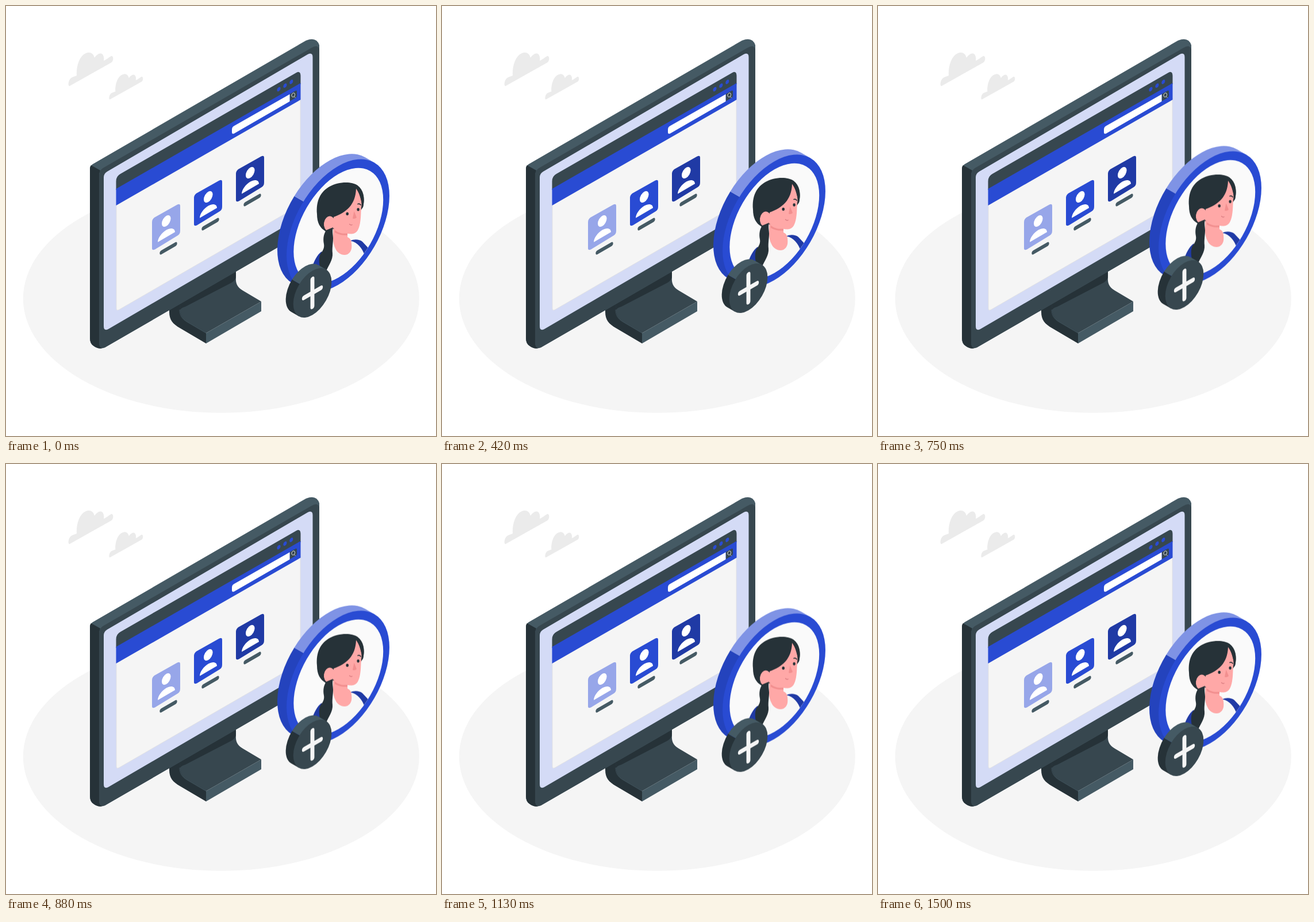
These frames come from a looping animation (748 by 748 pixels, 1.54 s). An HTML page:

```html
<!DOCTYPE html>
<html lang="en">
<head>
<meta charset="utf-8">
<title>Add a profile</title>
<style>
  html, body { margin: 0; width: 100%; height: 100%; overflow: hidden; background: #fff; }
  svg { display: block; width: 100vw; height: 100vh; }
</style>
</head>
<body>
<svg viewBox="0 0 748 748">
  <defs>
    <clipPath id="lens">
      <circle r="90" transform="matrix(.866 -.5 0 1 578.3 382.3)"/>
    </clipPath>
  </defs>

  <ellipse cx="374.3" cy="508.7" rx="344.5" ry="199" fill="#f5f5f5"/>

  <g fill="#ebebeb">
    <path id="cloud" d="M110 139.5C107 137 109 127 115 124L123 121C122 105 128 83 143 81C150 80 153 86 154 90C158 84 164 80 168 84C170 87 171 91 170 95C174 94 179 89 183 87C187 86 188 95 183 98.5Z"/>
    <use href="#cloud" transform="translate(97.2 57.1) scale(.757)"/>
  </g>

  <g id="stand">
    <path fill="#263238" d="M284 520V532C284 546 290 553 303 560.500L348 587V569L320 530V500Z"/>
    <path fill="#37474f" d="M303 510L400 452V473C399 484 404 490 412 495L444 514L348 569L314 549C304 543 301 532 303 518Z"/>
    <path fill="#263238" d="M303 510L400 452V468C400 475 397 479 391 482L312 523Q304 525 302 530Z"/>
    <path fill="#455a64" d="M348 569L444 514V531L348 587Z"/>
    <path fill="none" stroke="#455a64" stroke-width=".7" d="M302 528C302 538 306 544 314 549L348 569"/>
  </g>

  <g id="monitor">
    <path fill="#455a64" d="M146 283Q146 278 151 275L522 60Q540 53 545 68V370Q545 377 540 381L172 594Q160 598 152 591Q146 587 146 578Z"/>
    <path fill="#263238" d="M146 284Q146 279 148 277L164 286Q162 290 162 296V585Q162 593 168 595.300Q160 597 152 591Q146 587 146 578Z"/>
    <path fill="#37474f" d="M162 295Q162 286 168.500 282L531 73Q543 66 545 76V370Q545 377 540 381L172 594Q162 598 162 586Z"/>
    <path fill="#d4dbf6" d="M170 298Q170 291.500 176 288L525 84Q533.500 80 533.500 89V350Q533.500 355 528 358L178 562Q170 566 170 557Z"/>
    <path fill="#f5f5f5" stroke="#e0e0e0" stroke-width=".8" d="M192 346L512 162V340Q512 346 507 349L197 528Q192 531 192 526Z"/>
    <path fill="#37474f" d="M191.500 305Q191.500 296 199 292L505 116Q512 112 512.500 121V136L191.500 320Z"/>
    <path fill="#294bd3" d="M191.500 318L512.500 134V163L191.500 347Z"/>
    <g id="dots" fill="#294bd3"></g>
    <path fill="#fff" d="M393 215Q393 211 396 209L493.500 153.500V166L397 221.700Q393 223.500 393 219.500Z"/>
    <path fill="#37474f" d="M494 153L503.500 147.500Q506 146 506 149V156Q506 158 504 159.500L494 165.500Z"/>
    <path fill="none" stroke="#fff" stroke-width=".9" d="M501.500 157.500L503.300 159.500M497 156.500C496 152 502 149 502.500 153.500C503 158 498 160 497 156.500Z"/>
    <g id="cards"></g>
  </g>

  <g id="badge">
    <g id="ring"></g>
    <g clip-path="url(#lens)">
      <path fill="#f7f7f7" d="M552 421L568 408Q584 425 600 406L612 408L622 432L590 500H530Z"/>
      <path fill="#203aa5" d="M549 427C541 433 536 443 532 456L545 470L556 440Z"/>
      <path fill="#203aa5" d="M599 408.500C606 405 615 406 620 410L634 425L624 434C620 422 612 411 599 408.500Z"/>
      <path fill="#ffa8a7" d="M569 384L594 390V402Q601 405 601 413C602 421 601 428 594 432C586 435 577 431 573 422Q569 414 569 404Z"/>
      <path fill="#f28f8f" d="M572 390Q583 398 594 395V398.500Q582 400 572 394Z"/>
      <path fill="#263238" d="M556 392C546 386 541 377 541 362C539 339 547 323 563 314C577 306 600 304 611.500 312C622 320 625 334 621 350L604 374L569 388Z"/>
      <path fill="#ffa8a7" d="M609 317.500C614 325 619 335 618.500 347C617 354 618 366 616 377C614 388 611 396 601 396.500C589 396 577 392 569 386L570 367C592 359 608 346 609 317.500Z"/>
      <path fill="#263238" d="M609 317C616 326 617 338 621 350C624 338 623 325 614 315Z"/>
      <ellipse cx="562.500" cy="378.500" rx="9.500" ry="13" fill="#ffa8a7" transform="rotate(8 562.5 378.5)"/>
      <path fill="#263238" d="M569 385C567 392 569 398 569 404C569 413 567 421 568 430C569 442 561 451 556 463L547 458C544 448 544 437 547 431C552 425 554 420 553 414C551 404 553 396 557 390Z"/>
      <path fill="#f28f8f" d="M605.500 357L610 368Q607 371 603 369.500Z"/>
      <path fill="none" stroke="#d97b80" stroke-width="1.300" stroke-linecap="round" d="M597.500 379.500Q600 382 602 380.500"/>
      <g fill="#263238">
        <ellipse cx="593.700" cy="361.500" rx="2.300" ry="2.700"/>
        <ellipse cx="612.600" cy="354" rx="2.200" ry="2.700"/>
      </g>
      <path fill="none" stroke="#263238" stroke-width="1.700" stroke-linecap="round" d="M612 344.500Q615 343.500 617 346"/>
    </g>
    <g id="plus"></g>
  </g>
</svg>
<script>
const $ = id => document.getElementById(id);
// Upright plane seen in isometric projection
const plane = (x, y, body) => `<g transform="matrix(.866 -.5 0 1 ${x} ${y})">${body}</g>`;

function coin(x, y, r, depth, [face, light, dark], art) {
  const k = r * Math.SQRT1_2, sx = -.67 * r, sy = -.7424 * r;
  const side = (x1, y1, x2, y2, fill) =>
    `<path fill="${fill}" d="M${x1} ${y1}l${-depth} ${-depth}A${r} ${r} 0 0 1 ${x2 - depth} ${y2 - depth}l${depth} ${depth}L0 0Z"/>`;
  return plane(x, y,
    side(-k, k, sx, sy, dark) + side(sx, sy, k, -k, light) +
    `<circle r="${r}" fill="${face}"/>` + art);
}

$('ring').innerHTML = coin(577.5, 382, 103.3, 18.5,
  ['#294bd3', '#7f93e5', '#2443bd'], '<circle cx=".9" cy=".8" r="90" fill="#fafafa"/>');
$('plus').innerHTML = coin(533, 499, 38.5, 15,
  ['#37474f', '#455a64', '#263238'],
  '<path d="M0-24V24M-17 0H17" stroke="#f5f5f5" stroke-width="8" stroke-linecap="round"/>');

$('dots').innerHTML = [0, 1, 2]
  .map(i => plane(474.5 + 10.9 * i, 144.8 - 6.4 * i, '<circle r="3.5"/>')).join('');

$('cards').innerHTML = ['#97a6e9', '#294bd3', '#203aa5'].map((fill, i) =>
  `<g transform="translate(${73 * i} ${-42 * i})">
    <path fill="${fill}" d="M254 376Q254 371 258 368L298 345.5Q303 343 303 348V391Q303 396.500 299 399L259 423.500Q254 426 254 421Z"/>
    ${plane(278.8, 374, '<circle r="9" fill="#fff"/>')}
    ${plane(279, 402, '<path fill="#fff" d="M-17.300 0C-17.300-7-9-12.500 0-12.500S17.300-7 17.300 0Z"/>')}
    ${plane(282.5, 421.5, '<path stroke="#455a64" stroke-width="7" stroke-linecap="round" d="M-14 0H14"/>')}
  </g>`).join('');

// Steady float up and down, shown at 37 poses per loop
const poses = 37;
const at = (pose, y) => ({ offset: pose / poses, transform: `translateY(${y}px)` });
$('badge').animate(
  [at(0, 0), at(17.5, -14.19), at(36, .81), at(poses, 0)],
  { duration: 1540, delay: -5, iterations: Infinity, easing: `steps(${poses}, end)` });
</script>
</body>
</html>
```
